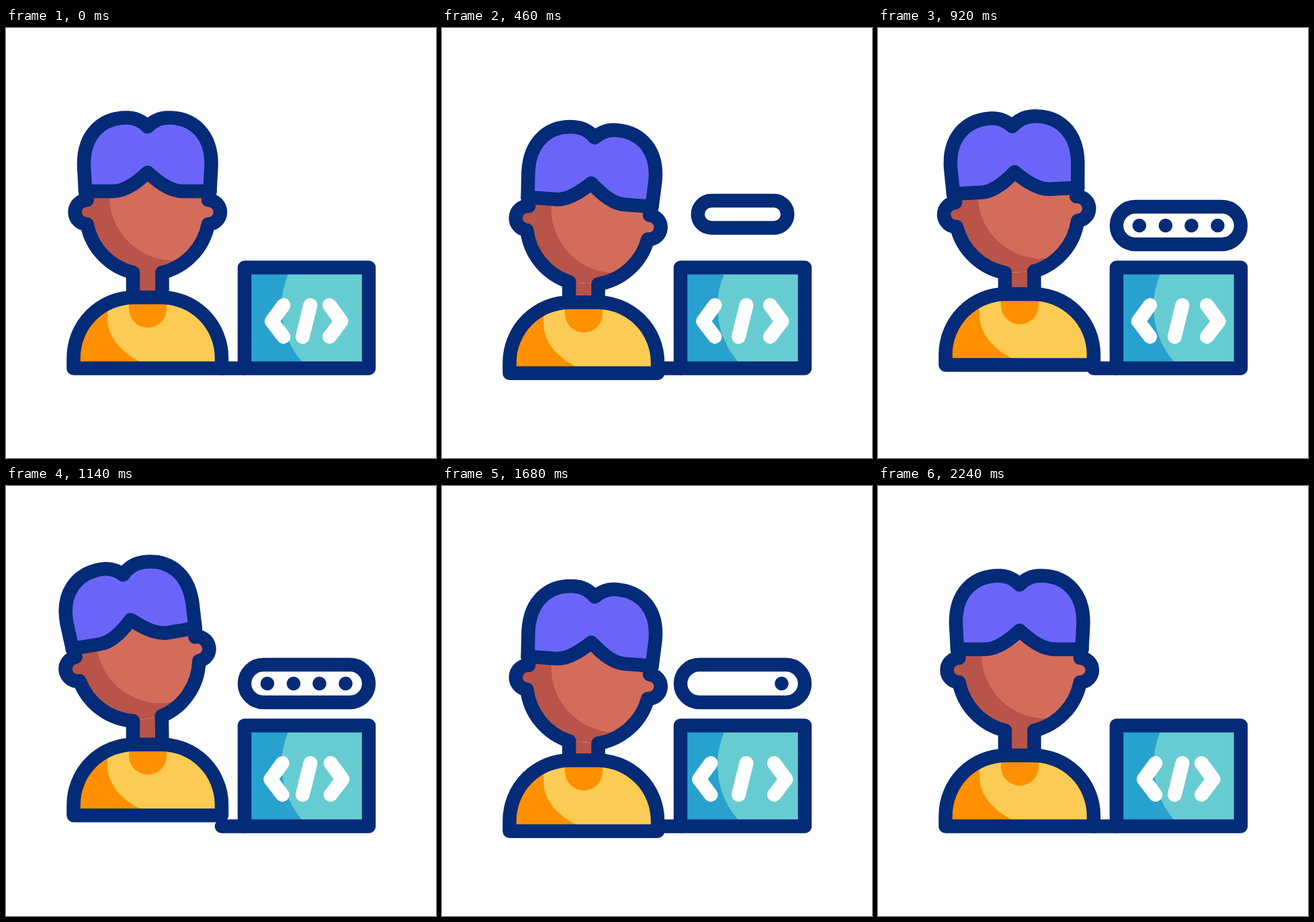
An HTML page that plays this animation: 640x640 px, repeating every 2.4 s.

```html
<!DOCTYPE html>
<html lang="en">
<head>
<meta charset="utf-8">
<title>Developer at work</title>
<style>
  html, body { margin: 0; width: 100%; height: 100%; overflow: hidden; background: #fff; }
  svg { display: block; width: 100%; height: 100%; }
  .line { fill: none; stroke: #032b77; stroke-width: 20.5; stroke-linecap: round; stroke-linejoin: round; }
  .code { fill: none; stroke: #fff; stroke-width: 21; stroke-linecap: round; stroke-linejoin: round; }
</style>
</head>
<body>
<svg viewBox="0 0 640 640">
  <defs>
    <path id="face" d="M118 243 L120.5 256 A18 18 0 0 0 120.5 292 A92.3 92.3 0 0 0 189 364 H232.5
      A92.3 92.3 0 0 0 301 292 A18 18 0 0 0 301 256 L303.5 243 H262 C242 243 222 225 210.75 215 C200 225 180 243 160 243 Z"/>
    <path id="hair" d="M118 243 L116 205 C115 160 141 133.5 180 133.5 C193 133.5 203 139 210.75 147
      C218.5 139 228.5 133.5 241.5 133.5 C280.5 133.5 306.5 160 305.5 205 L303.5 243
      H262 C242 243 222 225 210.75 215 C200 225 180 243 160 243 Z"/>
    <path id="cheek" d="M118 243 L120.5 256 A18 18 0 0 0 120.5 292 A92.3 92.3 0 0 0 189 364"/>
    <path id="torso" d="M100.5 506.5 V491 A90 90 0 0 1 190.5 401 H231 A90 90 0 0 1 321 491 V506.5 Z"/>
    <clipPath id="faceClip"><use href="#face"/></clipPath>
    <clipPath id="torsoClip"><use href="#torso"/></clipPath>
    <clipPath id="screenClip"><rect x="355" y="356.5" width="185" height="150"/></clipPath>
  </defs>

  <path id="neckFill" fill="#b85449"/>
  <g id="head">
    <use href="#face" fill="#b85449"/>
    <circle cx="250" cy="250" r="96" fill="#d36c5b" clip-path="url(#faceClip)"/>
    <use href="#hair" fill="#6a65f8"/>
    <use href="#hair" class="line"/>
    <use href="#cheek" class="line"/>
    <use href="#cheek" class="line" transform="translate(421.5) scale(-1 1)"/>
  </g>
  <path id="neckLine" class="line"/>

  <path class="line" d="M321 506.5 H355"/>
  <g id="body">
    <use href="#torso" fill="#ff9000"/>
    <g clip-path="url(#torsoClip)">
      <path fill="#fccb53" d="M151 390 V432 C151 460 172 483 200 497 L215 507 H330 V390 Z"/>
      <path fill="#ff9000" d="M183 400 V418 A28 28 0 0 0 239 418 V400 Z"/>
    </g>
    <use href="#torso" class="line"/>
  </g>

  <g clip-path="url(#screenClip)">
    <rect x="355" y="356" width="185" height="151" fill="#28a1cf"/>
    <circle cx="534" cy="415" r="124" fill="#67ccd1"/>
  </g>
  <rect class="line" x="355" y="356.5" width="185" height="150"/>
  <path id="leftChevron" class="code" d="M413 412.5 L395.5 436.5 L413 459.5"/>
  <path class="code" d="M453 412.5 L441.5 459.5"/>
  <path id="rightChevron" class="code" d="M481.5 412.5 L499 436.5 L481.5 459.5"/>

  <rect id="bubble" class="line" style="fill:#fff"/>
  <g id="dots" fill="#032b77">
    <circle cx="389" cy="294" r="10.3"/>
    <circle cx="428" cy="294" r="10.3"/>
    <circle cx="466.5" cy="294" r="10.3"/>
    <circle cx="505.5" cy="294" r="10.3"/>
  </g>
</svg>
<script>
  const LOOP = 2400;
  const PIVOT = { x: 210.75, y: 366 };
  const get = id => document.getElementById(id);
  const set = (el, attrs) => {
    for (const name in attrs) el.setAttribute(name, attrs[name]);
  };

  // Keys are [time, value] pairs, eased in and out between neighbours.
  function track(keys, time) {
    if (time <= keys[0][0]) return keys[0][1];
    for (let i = 1; i < keys.length; i++) {
      const [t0, v0] = keys[i - 1];
      const [t1, v1] = keys[i];
      if (time < t1) {
        const u = (time - t0) / (t1 - t0);
        return v0 + (v1 - v0) * u * u * (3 - 2 * u);
      }
    }
    return keys[keys.length - 1][1];
  }

  const sway = (side, middle) =>
    [[200, 0], [600, side], [1200, middle], [1800, side], [2200, 0]];
  const bodyKeys = sway(10, -17);
  const headKeys = sway(21.5, -19);
  const tiltKeys = sway(6, -10);
  const bubbleKeys = sway(1, 1);
  const chevronKeys = [[200, 0], [700, 13], [1200, 1.3], [1700, 13], [2200, 0]];
  const dots = [...get("dots").children];

  function drawPerson(time) {
    const bodyY = track(bodyKeys, time);
    const headY = track(headKeys, time);
    const tilt = track(tiltKeys, time);
    set(get("body"), { transform: `translate(0 ${bodyY})` });
    set(get("head"), { transform: `translate(0 ${headY}) rotate(${tilt} ${PIVOT.x} ${PIVOT.y})` });

    const angle = tilt * Math.PI / 180;
    const jaw = x => {
      const dx = x - PIVOT.x, dy = 364 - PIVOT.y;
      return [
        PIVOT.x + dx * Math.cos(angle) - dy * Math.sin(angle),
        PIVOT.y + dx * Math.sin(angle) + dy * Math.cos(angle) + headY
      ].join(" ");
    };
    const base = 401 + bodyY;
    const left = jaw(189), right = jaw(232.5);
    set(get("neckFill"), { d: `M189 ${base} L${left} L${right} L232.5 ${base} Z` });
    set(get("neckLine"), { d: `M189 ${base} L${left} M${right} L232.5 ${base}` });
  }

  function drawBubble(time) {
    const size = track(bubbleKeys, time);
    const centerY = 234 + 60 * size;
    set(get("bubble"), {
      x: 447.5 - 92.5 * size, y: centerY - 28 * size,
      width: 185 * size, height: 56 * size, rx: 28 * size,
      visibility: size > 0 ? "visible" : "hidden"
    });
    dots.forEach((dot, i) => {
      const shown = time >= 600 + 100 * i && time < 1400 + 100 * i;
      set(dot, { visibility: shown ? "visible" : "hidden" });
    });
  }

  function draw(time) {
    drawPerson(time);
    drawBubble(time);
    const spread = track(chevronKeys, time);
    set(get("leftChevron"), { transform: `translate(${-spread} 0)` });
    set(get("rightChevron"), { transform: `translate(${spread} 0)` });
  }

  function tick() {
    draw(performance.now() % LOOP);
    requestAnimationFrame(tick);
  }
  tick();
</script>
</body>
</html>
```
